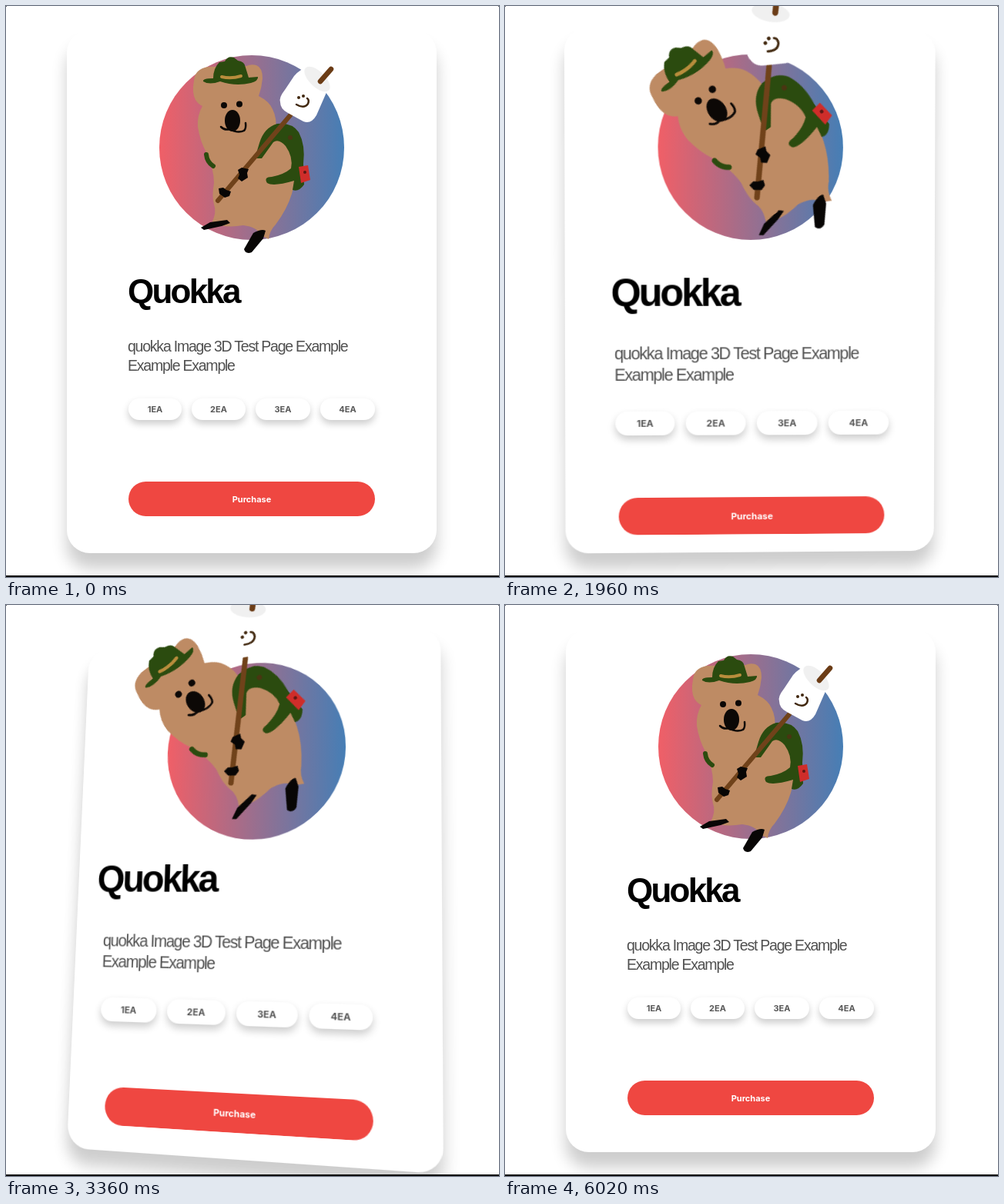
Recreate the animation shown at these times as an HTML page. Size 640 by 742 pixels, loop 6790 ms.

```html
<!DOCTYPE html>
<html lang="en">
<head>
<meta charset="utf-8">
<title>Quokka card</title>
<style>
  html, body { margin: 0; width: 100%; height: 100%; overflow: hidden; background: #fff; }
  #stage {
    position: relative; width: 640px; height: 742px; overflow: hidden;
    perspective: 1000px; perspective-origin: 319px 371px;
  }
  #card, #card * { box-sizing: border-box; }
  #card {
    position: absolute; left: 79px; top: 31px; width: 480px; height: 680px;
    border-radius: 30px; background: #fff; transform-style: preserve-3d;
    box-shadow: 0 20px 20px rgba(0, 0, 0, .2);
  }
  #card > * { position: absolute; margin: 0; }
  #circle {
    left: 120px; top: 33px; width: 240px; height: 240px; border-radius: 50%;
    background: linear-gradient(to right, #f05f67, #467eb5);
  }
  #hero { left: 80px; top: -7px; width: 320px; height: 320px; overflow: visible; }
  #title, #text {
    left: 79px; white-space: nowrap; letter-spacing: -.063em;
    font-family: "Liberation Sans", Arial, sans-serif;
  }
  #title { top: 310px; font-size: 44px; font-weight: bold; line-height: 60px; color: #000; }
  #text { top: 399px; font-size: 19.5px; line-height: 24.5px; color: #505050; }
  #sizes { left: 80px; top: 479px; width: 320px; height: 28px; }
  .pill, #buy {
    display: flex; align-items: center; justify-content: center;
    font: bold 11px Inter, Roboto, sans-serif;
  }
  .pill {
    position: absolute; top: 0; height: 28px; border-radius: 30px;
    background: #fff; color: #585858; box-shadow: 0 5px 10px rgba(0, 0, 0, .2);
  }
  .pill.on { background: #585858; color: #fff; }
  #buy { left: 80px; top: 587px; width: 320px; height: 45px; border-radius: 30px; color: #fff; }
  #line { position: absolute; left: 0; top: 740px; width: 640px; height: 2px; background: #000; }
  .dot { position: absolute; top: 0; width: 1px; height: 1px; background: #555; }
</style>
</head>
<body>
<div id="stage">
  <div id="card">
    <div id="circle"></div>
    <svg id="hero" viewBox="159 24 320 320" fill="none" stroke-linecap="round" stroke-linejoin="round">
      <!-- body -->
      <path fill="#be8b64" d="M262 79Q245 82 244 97Q241 113 246 122Q250 128 255 130Q248 142 249 157Q252 176 260 190
        Q270 212 270 230Q267 247 270 258Q274 268 267 282Q285 289 308 285Q326 287 331 298L341 303Q342 292 350 284
        Q365 264 371 244Q377 226 374 205Q368 178 350 160Q352 146 346 134Q342 124 328 117Q332 106 333 94
        Q333 80 325 77Q318 75 312 78Z"/>
      <!-- hat -->
      <path fill="#2b4b0f" d="M269 94Q269 81 277 73L284 72Q288 64 296 67L301 71Q310 72 311 80L315 93L327 92
        Q328 97 318 100Q298 105 278 98Q264 103 256 98Q255 94 269 94Z"/>
      <path stroke="#b98d3c" stroke-width="4" d="M280 92Q292 95 305 91"/>
      <!-- face -->
      <g fill="#0c0806">
        <circle cx="283" cy="129" r="4"/><circle cx="303" cy="127.500" r="4"/>
        <ellipse cx="294" cy="149" rx="10" ry="14"/>
      </g>
      <path stroke="#0c0806" stroke-width="2.500" d="M279 157Q284 162 290 160Q301 166 309 162Q312 159 311 152"/>
      <!-- arm and backpack -->
      <path stroke="#2b4b0f" stroke-width="6" d="M260 193Q261 203 269 208"/>
      <path fill="#2b4b0f" d="M323 198L329 178Q335 158 352 153Q371 151 380 164Q389 181 386 205L387 232Q380 242 372 239
        L374 227Q347 235 339 230Q334 222 345 222Q361 219 370 211Q373 196 363 182Q354 172 347 177L332 198Z"/>
      <path fill="#cf2d2a" d="M380 209L392 207L395 226L383 230Z"/>
      <circle cx="388" cy="216" r="2" fill="#5d1714"/><circle cx="369" cy="171" r="3" fill="#4a3512"/>
      <!-- stick and marshmallow -->
      <path stroke="#70421a" stroke-width="6" d="M275 253L369 142"/>
      <path fill="#fff" d="M356 125Q354 119 362 109L374 91Q386 77 397 82L416 92Q424 98 417 110L403 142
        Q396 154 386 150L366 139Q356 134 356 125Z"/>
      <ellipse cx="404" cy="95" rx="21" ry="10" fill="#f0f0f0" transform="rotate(44 404 95)"/>
      <path stroke="#6b3c16" stroke-width="6.500" d="M408 98L422 82"/>
      <g fill="#41280f"><circle cx="380" cy="119" r="2"/><circle cx="386" cy="117" r="2"/></g>
      <path stroke="#41280f" stroke-width="2.500" d="M377 128Q387 134 392 127Q394 122 391 120"/>
      <!-- paws and feet -->
      <g fill="#080605">
        <path d="M301 213L306 210L315 212L313 217L314 223L306 228L301 224L303 219Z"/>
        <path d="M276 237L282 236L286 239L292 241L290 247L284 249L277 244Z"/>
        <path d="M253 288L265 281L287 278L291 282L280 286L257 291Z"/>
        <path d="M309 316L321 295Q332 289 337 292L334 302L319 320Q311 323 309 316Z"/>
      </g>
    </svg>
    <h1 id="title">Quokka</h1>
    <p id="text">quokka Image 3D Test Page Example<br>Example Example</p>
    <div id="sizes"></div>
    <div id="buy">Purchase</div>
  </div>
  <div id="line"></div>
  <div class="dot" style="left:0"></div>
  <div class="dot" style="left:639px"></div>
</div>
<script>
  const LOOP = 6790, STEP = 70;
  const ENTER = 1045, LEAVE = 4545;
  const $ = id => document.getElementById(id);

  const pills = [[0, 69], [82, 70], [165, 71], [249, 71]].map(([x, w], i) => {
    const el = document.createElement('div');
    el.className = 'pill';
    el.textContent = (i + 1) + 'EA';
    el.style.left = x + 'px';
    el.style.width = w + 'px';
    $('sizes').append(el);
    return el;
  });

  const clamp = v => Math.min(1, Math.max(0, v));
  const mix = (a, b, k) => a + (b - a) * k;

  // CSS-style cubic-bezier timing
  function bezier(x1, y1, x2, y2) {
    const at = (a, b, u) => 3 * a * u * (1 - u) ** 2 + 3 * b * u * u * (1 - u) + u ** 3;
    return x => {
      if (x <= 0 || x >= 1) return clamp(x);
      let lo = 0, hi = 1;
      for (let i = 0; i < 24; i++) {
        const mid = (lo + hi) / 2;
        if (at(x1, x2, mid) < x) lo = mid; else hi = mid;
      }
      return at(y1, y2, lo);
    };
  }
  const easeOut = bezier(0, 0, .58, 1);
  const ease = bezier(.25, .1, .25, 1);
  const run = (t, start, length, curve = easeOut) => curve(clamp((t - start) / length));

  // pointer tilt: time, rotateY, rotateX
  const tilts = [
    [1050, 10, 2.5], [1470, 9.5, 4.2], [2520, -8.8, -6.6],
    [3360, -11.2, 6.2], [3920, -15.3, -.4], [4545, -15, .5]
  ];

  function tiltAt(t) {
    if (t < ENTER) return [0, 0];
    let i = 0;
    while (i < tilts.length - 2 && t > tilts[i + 1][0]) i++;
    const [p, q] = [tilts[i], tilts[i + 1]];
    const u = clamp((t - p[0]) / (q[0] - p[0]));
    const k = u * u * (3 - 2 * u);
    const back = 1 - run(t, LEAVE, 400, ease);
    return [mix(p[1], q[1], k) * back, mix(p[2], q[2], k) * back];
  }

  const lift = (id, z, extra = '') => {
    $(id).style.transform = `translateZ(${z}px) ${extra}`;
  };

  function draw(t) {
    const [ry, rx] = tiltAt(t);
    $('card').style.transform = `rotateY(${ry}deg) rotateX(${rx}deg)`;

    const out = run(t, ENTER, 750) * (1 - run(t, LEAVE, 960));
    lift('hero', 150 * out, `rotateZ(${-35 * out}deg)`);
    lift('title', 125 * out);
    lift('text', 100 * out);
    lift('sizes', 100 * out);
    lift('buy', 75 * out);

    pills[3].classList.toggle('on', t >= 2240 && t < 2800);
    const hot = run(t, 3450, 700) * (1 - run(t, 4850, 600));
    const rgb = [[239, 71, 65], [155, 93, 182]];
    $('buy').style.background = `rgb(${rgb[0].map((c, i) => Math.round(mix(c, rgb[1][i], hot)))})`;
  }

  const origin = performance.now();
  function tick() {
    const t = (performance.now() - origin) % LOOP;
    draw(Math.floor(t / STEP) * STEP);
    requestAnimationFrame(tick);
  }
  tick();
</script>
</body>
</html>
```
